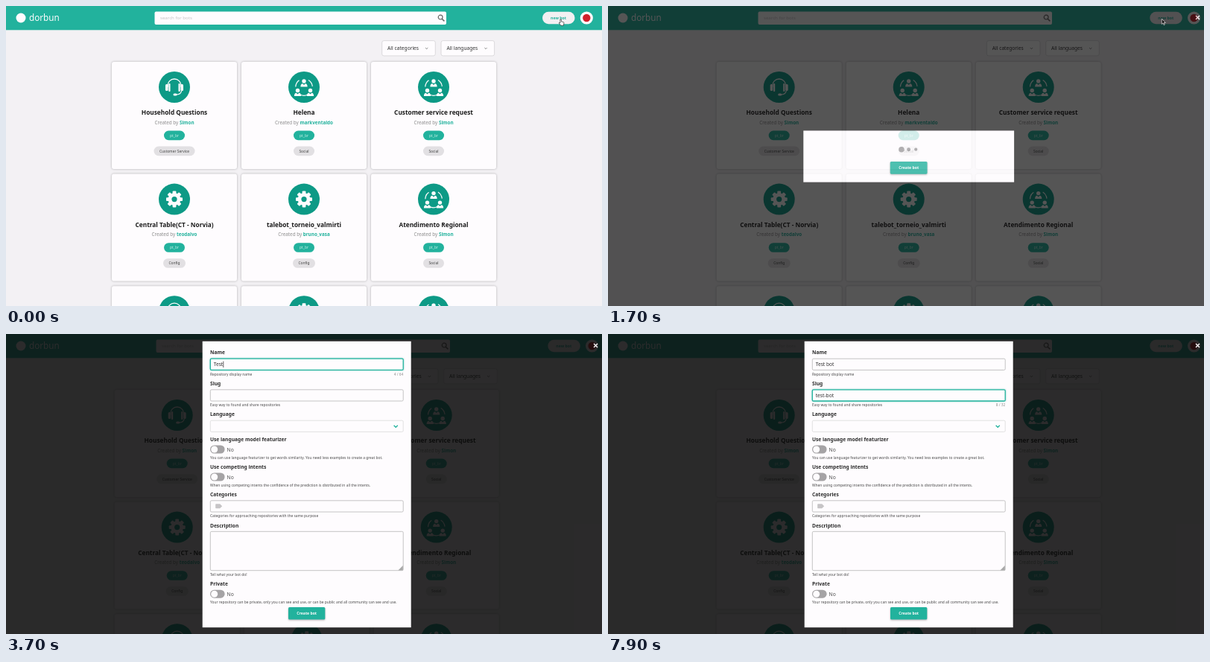
These frames come from a looping animation (800 by 403 pixels, 8000 ms). An HTML page:

```html
<!DOCTYPE html>
<html lang="en">
<head>
<meta charset="utf-8">
<title>Create a bot</title>
<style>
html, body { margin: 0; width: 100%; height: 100%; overflow: hidden; background: #f3f1f4; }
svg { display: block; width: 800px; height: 403px; }
text { font-family: "Noto Sans", "Open Sans", sans-serif; white-space: pre; }
.card { fill: #fefcfe; filter: drop-shadow(0 0 1.5px rgba(0, 0, 0, .28)); }
.field { fill: #fefcfe; stroke: #b5b5b5; stroke-width: .8; }
.field.pale { stroke: #dbdbdb; }
.field.focus { stroke: #22b29d; stroke-width: 1.3; filter: drop-shadow(0 0 1px rgba(34, 178, 157, .5)); }
.btn { fill: #22b29d; filter: drop-shadow(0 1px 1px rgba(0, 0, 0, .3)); }
</style>
</head>
<body>
<svg id="stage" viewBox="0 0 800 403" xmlns="http://www.w3.org/2000/svg"></svg>
<script>
const NS = 'http://www.w3.org/2000/svg';
const TEAL = '#22b29d', DARK = '#0d9a86', INK = '#1c1c1c', WHITE = '#fefcfe';
const LOOP = 8000, STEP = 100;
const stage = document.getElementById('stage');

function el(parent, tag, attrs = {}) {
  const node = document.createElementNS(NS, tag);
  for (const key in attrs) node.setAttribute(key, attrs[key]);
  return parent.appendChild(node);
}
const set = (node, attrs) => { for (const key in attrs) node.setAttribute(key, attrs[key]); };
const show = (node, on) => { node.style.display = on ? '' : 'none'; };
const group = (parent, x = 0, y = 0) => el(parent, 'g', { transform: `translate(${x} ${y})` });
const box = (parent, x, y, width, height, rx, attrs) => el(parent, 'rect', { x, y, width, height, rx, ...attrs });
const dot = (parent, cx, cy, r, fill) => el(parent, 'circle', { cx, cy, r, fill });
const path = (parent, d, attrs) => el(parent, 'path', { d, fill: 'none', ...attrs });
function text(parent, x, y, str, size, fill = INK, attrs = {}) {
  const node = el(parent, 'text', { x, y, 'font-size': size, fill, ...attrs });
  node.textContent = str;
  return node;
}
const mid = { 'text-anchor': 'middle' };
const bold = { 'font-weight': 700 };

// Icons, centred on 0,0
const icons = {
  headset(g) {
    const line = { stroke: WHITE, 'stroke-width': 1.3 };
    path(g, 'M-9 0V-2A9 9 0 0 1 9 -2V0', line);
    path(g, 'M9.5 5Q9 10 2 10', line);
    for (const s of [-1, 1]) {
      box(g, s * 10.2 - 1.8, -4, 3.6, 9, 1.5, { fill: WHITE });
      box(g, s * 6.6 - 1.1, -5, 2.2, 11, 1, { fill: WHITE });
    }
    box(g, -1.5, 8.5, 5, 3, 1.5, { fill: WHITE });
  },
  gear(g) {
    for (let i = 0; i < 8; i++)
      box(g, -2.4, -11, 4.8, 6, 1, { fill: WHITE, transform: `rotate(${i * 45})` });
    dot(g, 0, 0, 8.4, WHITE);
    dot(g, 0, 0, 3.6, DARK);
  },
  people(g) {
    for (const a of [0, 120, 240])
      path(g, 'M6 -9.5A11.3 11.3 0 0 1 11.3 -1', { stroke: WHITE, 'stroke-width': 1.2, transform: `rotate(${a})` });
    for (const [x, y] of [[0, -8], [-8.5, 4.5], [8.5, 4.5]]) {
      dot(g, x, y, 2.7, WHITE);
      path(g, `M${x - 4.6} ${y + 7.5}Q${x - 4.6} ${y + 3.4} ${x - 1.8} ${y + 3.2}L${x} ${y + 5}L${x + 1.8} ${y + 3.2}Q${x + 4.6} ${y + 3.4} ${x + 4.6} ${y + 7.5}Z`, { fill: WHITE });
    }
  }
};

// Page
box(stage, 0, 0, 800, 403, 0, { fill: '#f3f1f4' });
const main = group(stage);

const cards = [
  ['headset', 'Household Questions', 'Simon', 'Customer Service', 55],
  ['people', 'Helena', 'markventaldo', 'Social', 28],
  ['people', 'Customer service request', 'Simon', 'Social', 28],
  ['gear', 'Central Table(CT - Norvia)', 'teodalvo', 'Config', 30],
  ['gear', 'talebot_torneio_valmirti', 'bruno_vasa', 'Config', 30],
  ['people', 'Atendimento Regional', 'Simon', 'Social', 28],
  ['headset'], ['gear'], ['people']
];
cards.forEach(([icon, title, owner, tag, tagWidth], i) => {
  const g = group(main, 226 + (i % 3) * 174, 75 + Math.floor(i / 3) * 150.6);
  box(g, -84, 0, 168, 144, 3, { class: 'card' });
  dot(g, 0, 34, 21, DARK);
  icons[icon](group(g, 0, 34));
  if (!title) return;
  text(g, 0, 71, title, 8.3, INK, { ...mid, ...bold });
  const by = text(g, 0, 83.7, 'Created by ', 6.3, '#8c8c8c', mid);
  const name = el(by, 'tspan', { fill: TEAL, 'font-weight': 600 });
  name.textContent = owner;
  box(g, -14, 92.6, 28, 12.6, 6.3, { fill: TEAL });
  text(g, 0, 100.6, 'pt_br', 4.9, '#c9efe8', mid);
  box(g, -tagWidth / 2, 113.6, tagWidth, 12.6, 6.3, { fill: '#e2e0e3' });
  text(g, 0, 121.7, tag, 4.9, '#444', mid);
});

for (const [x, label] of [[504.7, 'All categories'], [584, 'All languages']]) {
  box(main, x, 46.6, 71.6, 20.3, 2.5, { fill: WHITE, stroke: '#d4d2d5', 'stroke-width': .8 });
  text(main, x + 7.4, 59.1, label, 6.65, '#333');
  path(main, `M${x + 58.4} 56.1l1.6 1.6l1.6 -1.6`, { stroke: '#666', 'stroke-width': .8 });
}

// Header
box(stage, 0, 0, 800, 32.3, 0, { fill: TEAL });
dot(stage, 20, 16, 6.5, WHITE);
text(stage, 31, 20.3, 'dorbun', 11.7, WHITE);
const search = box(stage, 199.5, 7.5, 391.5, 17.5, 2, { fill: WHITE });
const hint = text(stage, 207, 18.3, 'search for bots', 6.1, '#c6c4c7');
const lens = group(stage);
el(lens, 'circle', { cx: -.9, cy: -.9, r: 2.9, fill: 'none', stroke: '#666', 'stroke-width': 1.2 });
path(lens, 'M1.2 1.2L4.4 4.4', { stroke: '#666', 'stroke-width': 1.5 });
const account = group(stage);
box(account, 720, 7.8, 43.5, 16.4, 8.2, { fill: '#f2f0f2' });
text(account, 741.5, 18, 'new bot', 5.2, TEAL, { ...mid, ...bold });
dot(account, 779.3, 16, 8.6, WHITE);
dot(account, 779.3, 16, 5.2, '#d0202c');

// Modal
const modal = group(stage);
box(modal, 0, 0, 800, 403, 0, { fill: '#0a0a0a', 'fill-opacity': .86 });
path(modal, 'M789 13l5 5M794 13l-5 5', { stroke: WHITE, 'stroke-width': 1.4 });
const panel = group(modal);

function createButton(parent, y) {
  box(parent, 379, y, 49.3, 16.4, 1.5, { class: 'btn' });
  text(parent, 403.7, y + 10.2, 'Create bot', 5.1, WHITE, { ...mid, ...bold });
}

const loading = group(panel);
box(loading, 263.7, 167.8, 280, 68.5, 0, { fill: WHITE });
const dots = [394, 403.6, 413.1].map(x => dot(loading, x, 192.8, 3, '#a5a3a5'));
createButton(loading, 209);

const form = group(panel);
box(form, 263.7, 9.8, 280, 384.4, 0, { fill: WHITE });
createButton(form, 367);

// label, baseline, help, help baseline
const rows = [
  ['Name', 27.3, 'Repository display name', 55.7],
  ['Slug', 68.8, 'Easy way to found and share repositories', 97.3],
  ['Language', 110.4],
  ['Use language model featurizer', 143.8, 'You can use language featurizer to get words similarity. You need less examples to create a great bot.', 167.7],
  ['Use competing intents', 180.9, 'When using competing intents the confidence of the prediction is distributed in all the intents.', 204.8],
  ['Categories', 218, 'Categories for approaching repositories with the same purpose', 246.3],
  ['Description', 260.1, 'Tell what your bot do!', 325],
  ['Private', 338.4, 'Your repository can be private, only you can see and use, or can be public and all community can see and use.', 362.2]
];
for (const [label, y, help, helpY] of rows) {
  text(form, 274, y, label, 6.67, '#2c2c2c', { 'font-weight': 600 });
  if (help) text(form, 274, helpY, help, 4.89, '#4a4a4a');
}
const field = (y, h, extra = '') => box(form, 274.3, y, 258.9, h, 1.6, { class: 'field ' + extra });

function input(y) {
  const frame = field(y, 15.2);
  const value = text(form, 278.7, y + 10, '', 6.67, '#333');
  const caret = box(form, 0, y + 3.4, .7, 8.4, 0, { fill: '#222' });
  const count = text(form, 533.4, y + 22.5, '', 4.89, '#8e8e8e', { 'text-anchor': 'end' });
  return (str, max, focus, blink) => {
    frame.setAttribute('class', focus ? 'field focus' : 'field');
    if (value.textContent !== str) value.textContent = str;
    const end = str ? value.getComputedTextLength() : 0;
    caret.setAttribute('x', 278.9 + end);
    show(caret, focus && blink);
    show(count, focus);
    count.textContent = `${str.length} / ${max}`;
  };
}
const nameInput = input(33.2);
const slugInput = input(74.8);

field(116.2, 15.2, 'pale');
path(form, 'M520.6 122.7l2.6 2.6l2.6 -2.6', { stroke: TEAL, 'stroke-width': 1.3 });
field(223.8, 15.2);
path(form, 'M282 228.3h5.2l3 3l-3 3h-5.2q-.8 0 -.8 -.8v-4.4q0 -.8 .8 -.8Z', { fill: '#c6c4c6' });
field(265.3, 52.4);
path(form, 'M532.8 311v6.4h-6.4Z', { fill: '#a9a9a9' });
for (const y of [155, 192, 349.2]) {
  box(form, 274, y - 5.5, 19.6, 11, 5.5, { fill: '#a5a3a5' });
  dot(form, 279.7, y, 4.5, WHITE);
  text(form, 296.6, y + 2.5, 'No', 6.67, '#4a4a4a');
}

// Pointers, tip on 0,0
const pointer = group(stage);
const edge = { stroke: '#fff', 'stroke-width': .6, 'stroke-linejoin': 'round' };
const arrow = path(pointer, 'M0 0V7.2L1.7 5.7L2.9 8.4L4 7.9L2.8 5.3H5.1Z', { ...edge, fill: '#111' });
const hand = path(pointer, 'M.6 .8q.8 -.9 1.4 .1v2.8l2.8 .6q.9 .3 .8 1.2l-.5 3.5h-3.6l-2.6 -3.2q0 -1 1 -.6l.7 .6Z', { ...edge, fill: '#fff', stroke: '#111' });
const beam = path(pointer, 'M-1.4 -4H1.4M0 -4V4M-1.4 4H1.4', { stroke: '#222', 'stroke-width': .7 });

// Timed values: each holds from its time on
const at = (table, t) => table.reduce((last, [from, v]) => t >= from ? v : last, table[0][1]);
const fade = [[0, 0], [1600, .2], [1700, .8], [1800, 1]];
const zoom = [[0, 1.04], [1700, 1.01], [1800, 1]];
const nameText = [[0, ''], [3200, 'T'], [3300, 'Te'], [3500, 'Tes'], [3700, 'Test'], [4100, 'Test '], [4500, 'Test bo'], [4700, 'Test bot']];
const slugText = [[0, ''], [6500, 't'], [6600, 'te'], [6800, 'tes'], [6900, 'test'], [7100, 'test-'], [7300, 'test-b'], [7500, 'test-bot']];
const caretOn = [[0, true], [4800, false], [5500, true], [7900, false]];

function draw(t) {
  const open = t >= 1600;
  set(main, { transform: `translate(${open ? 3.7 : 0} 0)` });
  set(account, { transform: `translate(${open ? 7.3 : 0} 0)` });
  set(search, { x: open ? 201.5 : 199.5, width: open ? 394.5 : 391.5 });
  set(hint, { x: open ? 209 : 207 });
  set(lens, { transform: `translate(${open ? 589 : 584} 16)` });

  show(modal, open);
  set(modal, { opacity: at(fade, t) });
  set(panel, { transform: `translate(403.7 202) scale(${at(zoom, t)}) translate(-403.7 -202)` });
  show(loading, t < 2000);
  show(form, t >= 2000);
  dots.forEach((d, i) => set(d, { r: 3 + Math.cos((t - 1800) / 800 * 2 * Math.PI - i * 1.4) }));

  const blink = at(caretOn, t);
  nameInput(at(nameText, t), 64, t >= 2800 && t < 6100, blink);
  slugInput(at(slugText, t), 32, t >= 6100, blink);

  const k = Math.min(1, Math.max(0, (t - 2000) / 600));
  const ease = k * k * (3 - 2 * k);
  set(pointer, { transform: `translate(${743.3 - 348 * ease} ${17.2 + 23.5 * ease})` });
  show(pointer, t < 3200);
  show(hand, t < 1500);
  show(arrow, t >= 1500 && k < 1);
  show(beam, k === 1);
}

function tick(now) {
  draw(Math.floor(now % LOOP / STEP) * STEP);
  requestAnimationFrame(tick);
}
draw(0);
requestAnimationFrame(tick);
</script>
</body>
</html>
```
